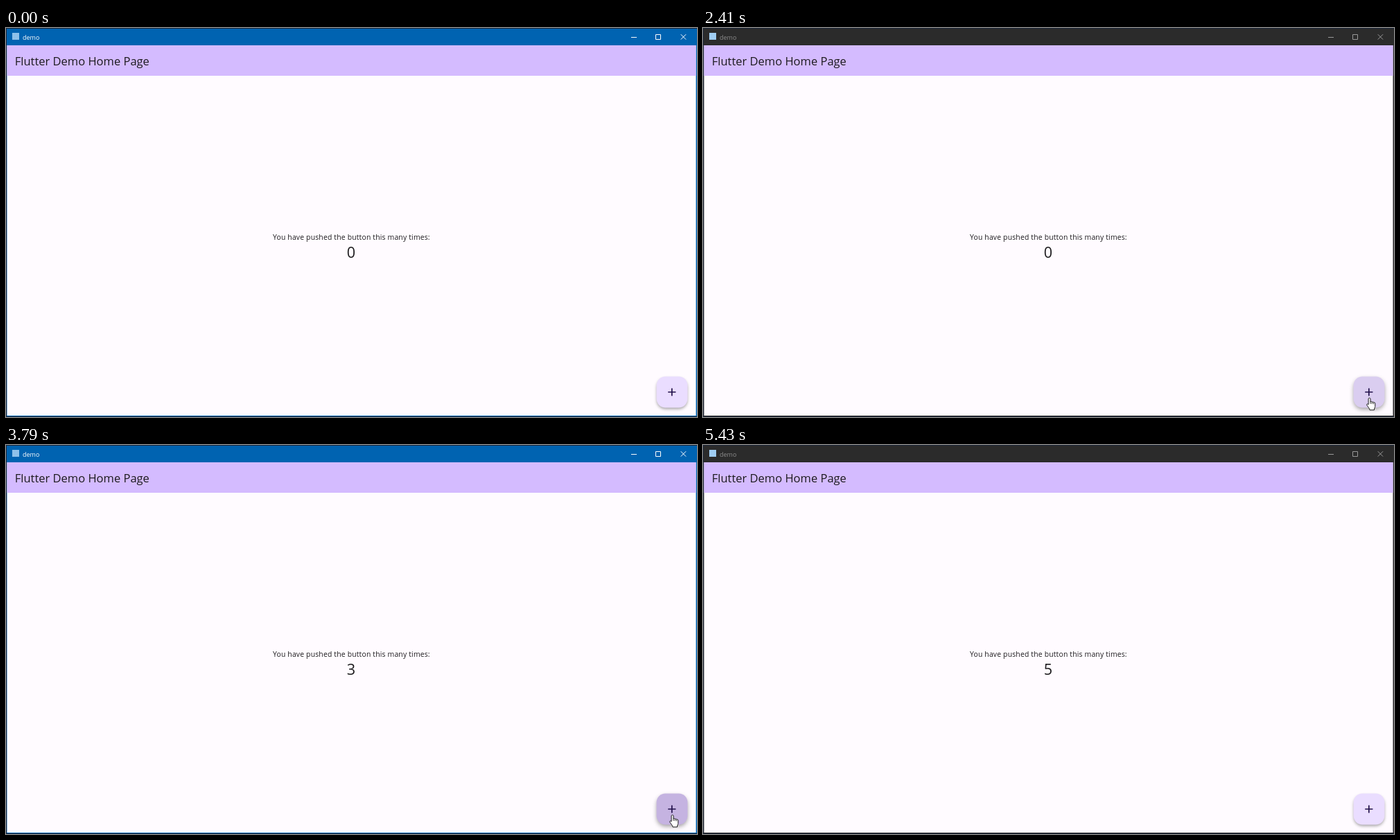
Recreate the animation shown at these times as an HTML page. Size 997x562 px, loop 5620 ms.

```html
<!DOCTYPE html>
<html lang="en">
<head>
<meta charset="utf-8">
<title>demo</title>
<style>
  html, body { margin: 0; width: 100%; height: 100%; overflow: hidden; background: #fffbff; }
  svg { display: block; width: 997px; height: 562px; }
  text { font-family: "Open Sans", "Noto Sans", sans-serif; fill: #1d1b1e; }

  /* Every change is a hard cut on one shared 5620 ms loop. */
  .frame, .caption, .controls, .logo, .digits, .fab, .shadow, .hover-shadow, .resize, .hand {
    animation: 5620ms step-end infinite;
  }

  .frame { animation-name: frame; }
  .caption { font-size: 9px; animation-name: caption; }
  .controls { fill: none; stroke-width: 1; animation-name: controls; }
  .logo { animation-name: logo; }
  .title { font-size: 16.5px; }
  .label { font-size: 10.4px; letter-spacing: .18px; text-anchor: middle; }
  .digits { font-size: 21.6px; text-anchor: middle; animation-name: count; }
  .fab { animation-name: press; }
  .shadow { animation-name: rest; }
  .hover-shadow { animation-name: hover; }
  .resize { animation-name: resize; }
  .hand { animation-name: hand; }

  @keyframes frame {
    0%, 49.46% { fill: #0063b1; }
    6.76%, 96.61% { fill: #2b2b2b; }
    100% { fill: #2b2b2b; }
  }
  @keyframes caption {
    0%, 49.46% { fill: #fff; }
    6.76%, 96.61%, 100% { fill: #8c8c8c; }
  }
  @keyframes controls {
    0%, 49.46% { stroke: #fff; }
    6.76%, 96.61%, 100% { stroke: #999; }
  }
  @keyframes logo {
    0%, 49.46% { fill: #8fc1ea; }
    6.76%, 96.61%, 100% { fill: #9fcdf2; }
  }
  @keyframes count {
    0% { transform: translateY(0); }
    53.38% { transform: translateY(-40px); }
    60.67% { transform: translateY(-80px); }
    67.43% { transform: translateY(-120px); }
    74.73% { transform: translateY(-160px); }
    85.94%, 100% { transform: translateY(-200px); }
  }
  @keyframes press {
    0%, 89.32%, 100% { fill: #eaddff; }
    38.96%, 56.76%, 64.05%, 78.64% { fill: #dacdf0; }
    53.38%, 60.67%, 67.43%, 82.02% { fill: #c5b3e1; }
    85.94% { fill: #d0c0e8; }
  }
  @keyframes rest {
    0%, 89.32%, 100% { opacity: 1; }
    38.96% { opacity: 0; }
  }
  @keyframes hover {
    0%, 89.32%, 100% { opacity: 0; }
    38.96% { opacity: 1; }
  }
  @keyframes resize {
    0%, 38.96%, 100% { opacity: 0; }
    35.58% { opacity: 1; }
  }
  @keyframes hand {
    0%, 89.32%, 100% { opacity: 0; transform: translate(957px, 534px); }
    38.96% { opacity: 1; transform: translate(944.5px, 534px); }
    42.88% { opacity: 1; transform: translate(957px, 534px); }
  }
</style>
</head>
<body>
<svg viewBox="0 0 997 562" xmlns="http://www.w3.org/2000/svg">
  <defs>
    <clipPath id="digit"><rect x="480" y="312" width="36" height="28"/></clipPath>
    <filter id="soft" x="-50%" y="-50%" width="200%" height="200%"><feGaussianBlur stdDeviation="2.2"/></filter>
    <filter id="wide" x="-50%" y="-50%" width="200%" height="200%"><feGaussianBlur stdDeviation="3.4"/></filter>
  </defs>

  <!-- Window -->
  <rect width="997" height="562" fill="#1b2536"/>
  <rect class="frame" x="1" y="1" width="996" height="560"/>
  <rect x="1.5" y="25" width="994" height="535" fill="#fffbff"/>
  <rect x="1.5" y="25" width="994" height="44" fill="#d4bbff"/>

  <rect class="logo" x="9" y="7" width="10" height="10"/>
  <text class="caption" x="24" y="16.5">demo</text>
  <g class="controls">
    <path d="M902 13.5h8M937.5 9.5h7v7h-7z"/>
    <path d="M973.7 9.2l7.4 7.4M981.1 9.2l-7.4 7.4"/>
  </g>

  <!-- Page -->
  <text class="title" x="12.8" y="54">Flutter Demo Home Page</text>
  <text class="label" x="498.4" y="306">You have pushed the button this many times:</text>
  <g clip-path="url(#digit)">
    <g class="digits">
      <text x="498" y="332.3">0</text>
      <text x="498" y="372.3">1</text>
      <text x="498" y="412.3">2</text>
      <text x="498" y="452.3">3</text>
      <text x="498" y="492.3">4</text>
      <text x="498" y="532.3">5</text>
    </g>
  </g>

  <!-- Floating button -->
  <g class="shadow">
    <rect x="939" y="506.5" width="44" height="44" rx="12.8" fill="#000" fill-opacity=".36" filter="url(#soft)"/>
  </g>
  <g class="hover-shadow">
    <rect x="939" y="507" width="44" height="44" rx="12.8" fill="#000" fill-opacity=".38" filter="url(#wide)"/>
  </g>
  <rect class="fab" x="938.6" y="503.6" width="44.8" height="44.8" rx="12.8"/>
  <path d="M955.2 526h11.2M960.8 520.4v11.2" fill="none" stroke="#21104a" stroke-width="1.7"/>

  <!-- Pointers -->
  <path class="resize" d="M962.5 553.7l3.2 3.8h-2v5h-2.4v-5h-2z" fill="#fff" stroke="#111" stroke-width=".9" stroke-linejoin="round"/>
  <g class="hand">
    <path d="M3.1 1.9C3.1 0 6 0 6 1.9V6.2C6.2 5.1 8.3 5.3 8.3 6.7C8.7 5.7 10.6 6 10.6 7.4C11.1 6.6 12.8 7 12.8 8.4V12.4C12.8 14.2 11.5 14.8 11.4 17.9H5C4.9 15.6 2.2 13.2 .8 10.8C0 9.4 1.8 8.5 3.1 10.1Z" fill="#fff" stroke="#000" stroke-width=".9" stroke-linejoin="round"/>
    <path d="M6 6.2V9M8.3 6.7V9.2M10.6 7.4V9.4" fill="none" stroke="#000" stroke-width=".8"/>
  </g>
</svg>
</body>
</html>
```
